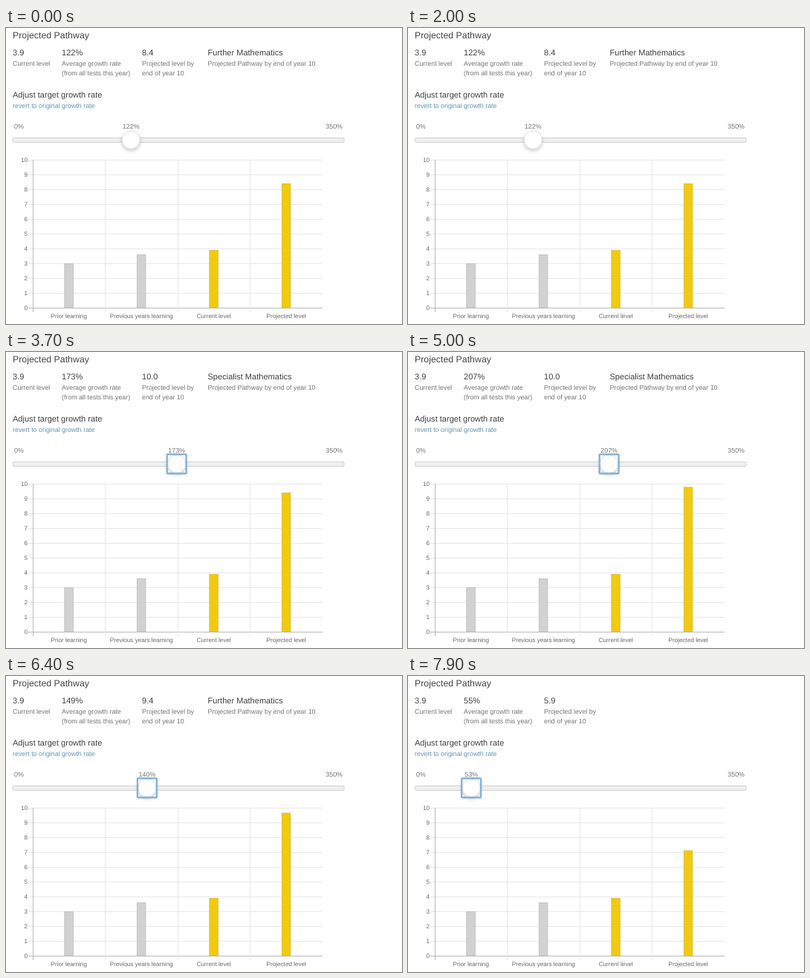
Animation of 533 by 400 pixels, one loop 8 s. Source, as an HTML page:

```html
<!DOCTYPE html>
<html lang="en">
<head>
<meta charset="utf-8">
<title>Projected Pathway</title>
<style>
  html, body { margin: 0; width: 100%; height: 100%; overflow: hidden; background: #fff; }
  svg { display: block; width: 533px; height: 400px; }
  text {
    font-family: "Liberation Sans", Arial, Helvetica, sans-serif;
    font-size: 8.9px; fill: #737373; text-rendering: geometricPrecision;
  }
  .title { font-size: 12.35px; fill: #444; }
  .head { font-size: 11.05px; fill: #3f3f3f; }
  .link { fill: #5d94b5; }
  .axis { font-size: 8.15px; fill: #666; }
  .mid { text-anchor: middle; }
  .end { text-anchor: end; }
</style>
</head>
<body>
<svg id="stage" viewBox="0 0 533 400">
  <defs>
    <filter id="shadow" x="-60%" y="-60%" width="220%" height="220%">
      <feDropShadow dx="0" dy="2.5" stdDeviation="2.6" flood-color="#000" flood-opacity=".22"/>
    </filter>
  </defs>
</svg>
<script>
const LOOP = 8000, STEP = 100;
const BASE_Y = 378, UNIT = 20, LEFT = 36, RIGHT = 426, COLUMN = 97.5;

// [time in ms, value]
const RATE = [[0, 122], [2500, 122], [3600, 173], [3700, 173], [4900, 207], [5100, 207],
  [5700, 195], [5800, 193], [6700, 113], [6900, 113], [7800, 55], [7900, 53]];
const BAR = [[0, 8.4], [2700, 8.4], [3700, 9.4], [5000, 9.78], [5800, 9.97], [6100, 9.97],
  [6900, 9.15], [7900, 7.12]];
const FOCUS_AT = 2500;

const stage = document.getElementById("stage");

function add(tag, attrs, parent = stage) {
  const el = document.createElementNS("http://www.w3.org/2000/svg", tag);
  for (const key in attrs) el.setAttribute(key, attrs[key]);
  parent.appendChild(el);
  return el;
}

function label(x, y, content, cls = "") {
  const el = add("text", { x, y, class: cls });
  el.textContent = content;
  return el;
}

function line(x1, y1, x2, y2, stroke) {
  add("line", { x1, y1, x2, y2, stroke, "stroke-width": 1 });
}

function bar(index, value, fill, stroke) {
  const el = add("rect", {
    x: LEFT + COLUMN * (index + 0.5) - 5.9, width: 11.6, fill, stroke, "stroke-width": 0.8
  });
  setBar(el, value);
  return el;
}

function setBar(el, value) {
  el.setAttribute("y", BASE_Y - value * UNIT + 0.4);
  el.setAttribute("height", value * UNIT - 0.4);
}

function sample(keys, t) {
  for (let i = 1; i < keys.length; i++) {
    const [t0, a] = keys[i - 1], [t1, b] = keys[i];
    if (t <= t1) return a + (b - a) * Math.max(0, t - t0) / (t1 - t0);
  }
  return keys[keys.length - 1][1];
}

// Summary
label(9, 13.5, "Projected Pathway", "title");
label(9, 37, "3.9", "head");
label(9, 51, "Current level");
const rateText = label(75, 37, "", "head");
label(75, 51, "Average growth rate");
label(75, 64, "(from all tests this year)");
const levelText = label(183, 37, "", "head");
label(183, 51, "Projected level by");
label(183, 64, "end of year 10");
const courseText = label(271.5, 37, "", "head");
const courseNote = label(271.5, 51, "Projected Pathway by end of year 10");
label(9, 93.5, "Adjust target growth rate", "head");
label(9, 107.5, "revert to original growth rate", "link");

// Slider
label(11, 135.5, "0%");
label(453, 135.5, "350%", "end");
const knobText = label(0, 135.5, "", "mid");
add("rect", { x: 9.5, y: 148.5, width: 445.5, height: 6, rx: 1, fill: "#efefef", stroke: "#d2d2d2" });
const knob = add("g", {});
add("circle", { cy: 151.2, r: 12, fill: "#fff", stroke: "#d6d6d6", "stroke-width": 0.7, filter: "url(#shadow)" }, knob);
const ring = add("rect", {
  x: -13, y: 138.2, width: 26, height: 26, rx: 1, fill: "none", stroke: "#83b3db", "stroke-width": 2.4
}, knob);

// Chart
for (let i = 0; i <= 10; i++) {
  const y = BASE_Y - i * UNIT;
  line(30, y + 0.5, RIGHT, y + 0.5, i ? "#e7e7e7" : "#b9b9b9");
  label(29, y + 3, i, "axis end");
}
["Prior learning", "Previous years learning", "Current level", "Projected level"].forEach((name, i) => {
  const x = Math.floor(LEFT + i * COLUMN) + 0.5;
  line(x, 178, x, 384, i ? "#e7e7e7" : "#b9b9b9");
  label(LEFT + COLUMN * (i + 0.5), 392, name, "axis mid");
});
bar(0, 3, "#d1d1d2", "#bcbcbc");
bar(1, 3.6, "#d1d1d2", "#bcbcbc");
bar(2, 3.9, "#f0ca10", "#d9bb3a");
const projected = bar(3, 8.4, "#f0ca10", "#d9bb3a");

function draw(t) {
  const rate = Math.round(sample(RATE, t));
  const shown = Math.round(sample(RATE, t - STEP)); // the summary trails the knob
  const level = Math.min(10, 3.9 + shown * 0.0366);
  const x = 21.3 + rate * 1.2045;

  rateText.textContent = shown + "%";
  levelText.textContent = level.toFixed(1);
  courseText.textContent = level >= 10 ? "Specialist Mathematics" : level >= 7 ? "Further Mathematics" : "";
  courseNote.setAttribute("visibility", level >= 7 ? "visible" : "hidden");

  knobText.textContent = rate + "%";
  knobText.setAttribute("x", x);
  knob.setAttribute("transform", `translate(${x} 0)`);
  ring.setAttribute("visibility", t >= FOCUS_AT ? "visible" : "hidden");
  setBar(projected, sample(BAR, t));
}

const start = performance.now();
function tick() {
  const t = (performance.now() - start) % LOOP;
  draw(Math.floor(t / STEP) * STEP);
  requestAnimationFrame(tick);
}
tick();
</script>
</body>
</html>
```
